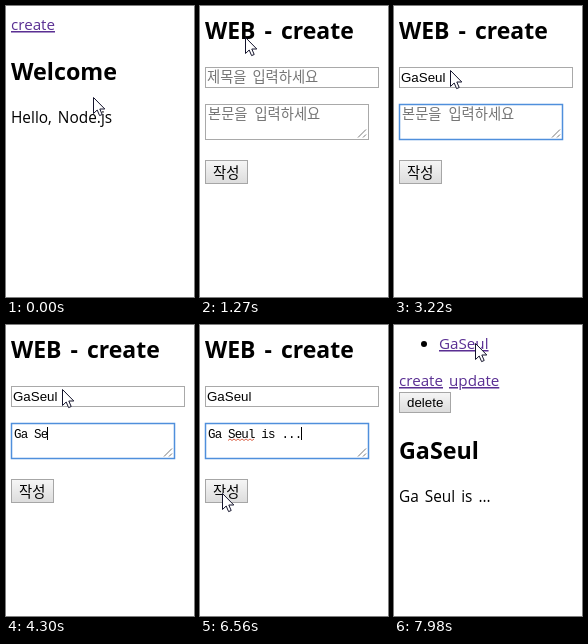
Recreate the animation shown at these times as an HTML page. Size 188 px wide and 291 px high, loop 8 s.

```html
<!DOCTYPE html>
<html lang="ko">
<head>
<meta charset="utf-8">
<title>WEB - create</title>
<style>
html, body { margin: 0; width: 100%; height: 100%; overflow: hidden; background: #fff; }
svg { display: block; width: 100vw; height: 100vh; }
text { font: 15.4px "Open Sans", "Noto Sans", sans-serif; word-spacing: 2px; white-space: pre; }
.h { font-weight: 700; font-size: 23.3px; }
.title { font-size: 23px; word-spacing: 3px; }
.link { font-size: 15.2px; fill: #5a2f93; text-decoration: underline; text-decoration-thickness: 1px; }
.ui { font: 13.33px "Liberation Sans", Arial, sans-serif; }
.ko { font: 14.3px "Noto Sans CJK KR", "Noto Sans CJK", sans-serif; }
.hint { fill: #757575; }
.mono { font: 12.5px "Liberation Mono", "Noto Sans Mono", monospace; letter-spacing: -.83px; word-spacing: 0; }
.menu text { font-size: 12.9px; }
.field { fill: #fff; stroke: #a9a9a9; }
.field.on { stroke: #4f8fdc; stroke-width: 1.5; }
.button { fill: url(#face); stroke: #a6a6a6; }
</style>
</head>
<body>
<svg viewBox="0 0 188 291" preserveAspectRatio="none">
  <defs>
    <linearGradient id="face" x2="0" y2="1">
      <stop stop-color="#f6f6f6"/><stop offset="1" stop-color="#dcdcdc"/>
    </linearGradient>
  </defs>

  <g id="list">
    <circle cx="30" cy="19" r="3"/>
    <text class="link" x="45" y="24">GaSeul</text>
  </g>

  <g id="home">
    <text class="link" x="5" y="24">create</text>
    <text class="h" x="5" y="74">Welcome</text>
    <text x="5" y="117">Hello, Node.js</text>
  </g>

  <g id="form">
    <text class="h title" x="5" y="33">WEB - create</text>
    <rect id="input" class="field" x="5.5" y="61.5" width="173" height="20"/>
    <text id="inputHint" class="ko hint" x="7" y="76">제목을 입력하세요</text>
    <text id="name" class="ui" x="7" y="76"></text>
    <rect id="inputCaret" y="65" width="1" height="14"/>
    <rect id="area" class="field" x="5.5" y="98.5" width="163" height="35"/>
    <path d="M158 131.5l8-8M163 131.5l3-3" stroke="#777" fill="none"/>
    <text id="areaHint" class="ko hint" x="8" y="113" style="word-spacing:3px">본문을 입력하세요</text>
    <text id="body" class="mono" x="8" y="112.5"></text>
    <path id="squiggle" d="M28 115.5l2-1.5 2 1.5 2-1.5 2 1.5 2-1.5 2 1.5 2-1.5 2 1.5 2-1.5 2 1.5 2-1.5 2 1.5 2-1.5" stroke="#d8573c" stroke-width=".9" fill="none"/>
    <rect id="areaCaret" y="102" width="1" height="13"/>
    <rect class="button" x="5.5" y="154.5" width="42" height="23"/>
    <text class="ko" x="13" y="171.5">작성</text>
    <g id="menu" class="menu">
      <rect id="menuBox" x="4.5" y="84.5" width="174" fill="#fff" stroke="#c4c4c4"/>
    </g>
  </g>

  <g id="detail">
    <text class="link" x="5" y="61">create</text>
    <text class="link" x="55" y="61">update</text>
    <rect class="button" x="5.5" y="67.5" width="51" height="20"/>
    <text class="ui" x="13" y="82">delete</text>
    <text class="h" x="5" y="134">GaSeul</text>
    <text x="5" y="177">Ga Seul is ...</text>
  </g>

  <path id="cursor" d="M.5.5v16l3.7-3.5 2.4 5.6 2.6-1.1-2.4-5.5h5z" fill="#fff" stroke="#14142c"/>
</svg>
<script>
const LOOP = 8000;
const $ = id => document.getElementById(id);
const show = (id, on) => { $(id).style.display = on ? '' : 'none'; };
const within = (t, a, b) => t >= a && t < b;

const NAME = 'GaSeul', BODY = 'Ga Seul is ...';
const nameKeys = [2090, 2230, 2470, 2570, 2680, 2780];
const bodyKeys = [3520, 3780, 3900, 4180, 4300, 4540, 4630, 4800, 4860, 4920, 5330, 5590, 5730, 5850];
const typed = (text, keys, t) => text.slice(0, keys.filter(k => t >= k).length);

// start, end, target x, target y
const moves = [[230, 520, 43, 23], [1170, 1530, 56, 64], [6300, 6560, 22, 168], [7460, 7900, 81, 18]];
const ease = p => p * p * (3 - 2 * p);

function cursorAt(t) {
  let x = 87, y = 91;
  for (const [a, b, tx, ty] of moves) {
    const p = ease(Math.min(1, Math.max(0, (t - a) / (b - a))));
    x += (tx - x) * p;
    y += (ty - y) * p;
  }
  return [Math.round(x), Math.round(y)];
}

const items = ['node', 'CSS', NAME, 'a', 'NodeJs', 'HTML'].map((label, i) => {
  const el = document.createElementNS('http://www.w3.org/2000/svg', 'text');
  el.textContent = label;
  el.setAttribute('x', 17);
  $('menu').append(el);
  return { el, label, y: 114 + 36 * i };
});

function drawMenu(t) {
  const open = within(t, 1570, 2780), filtered = t >= 2090;
  show('menu', open);
  if (!open) return;
  $('menuBox').setAttribute('height', filtered ? 49 : 240);
  for (const { el, label, y } of items) {
    el.style.display = filtered && label !== NAME ? 'none' : '';
    el.setAttribute('y', filtered ? 114 : y);
  }
}

function drawForm(t) {
  const name = typed(NAME, nameKeys, t), body = typed(BODY, bodyKeys, t);
  const inputOn = within(t, 1570, 2940), areaOn = t >= 2940;
  $('input').classList.toggle('on', inputOn);
  $('area').classList.toggle('on', areaOn);
  $('name').textContent = name;
  $('body').textContent = body;
  show('inputHint', !name);
  show('areaHint', !body);
  show('squiggle', t >= 4800);
  show('inputCaret', inputOn && !within(t, 1850, 2090));
  show('areaCaret', areaOn && !within(t, 3220, 3520) && !within(t, 6130, 6300));
  $('inputCaret').setAttribute('x', Math.round(7 + (name ? $('name').getComputedTextLength() : 0)));
  $('areaCaret').setAttribute('x', Math.round(8 + 6.67 * body.length));
  drawMenu(t);
}

function draw(t) {
  const form = within(t, 700, 6740), saved = t >= 6740, detail = t >= 7975;
  show('form', form);
  show('list', saved);
  show('detail', detail);
  show('home', !form && !detail);
  $('home').setAttribute('transform', `translate(0 ${saved ? 37 : 0})`);
  if (form) drawForm(t);
  $('cursor').setAttribute('transform', `translate(${cursorAt(t)})`);
}

const start = performance.now();
function tick() {
  draw((performance.now() - start) % LOOP);
  requestAnimationFrame(tick);
}
tick();
</script>
</body>
</html>
```
